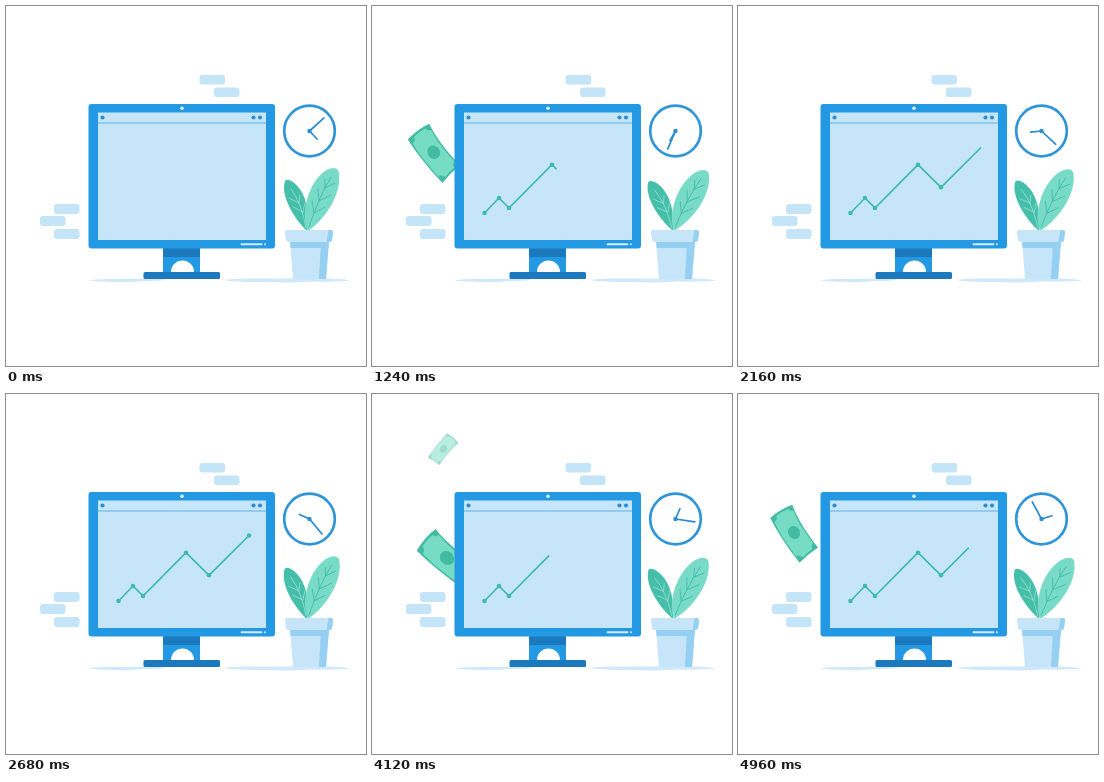
Recreate the animation shown at these times as an HTML page. Size 360 px wide and 360 px high, loop 5 s.

```html
<!DOCTYPE html>
<html lang="en">
<head>
<meta charset="utf-8">
<title>Growing chart</title>
<style>
  html, body { margin: 0; width: 100%; height: 100%; overflow: hidden; background: #fff; }
  svg { display: block; width: 100vw; height: 100vh; }
  .pale { fill: #c7e5f9; }
  .mid { fill: #95cff2; }
  .blue { fill: #2499e3; }
  .deep { fill: #1d79be; }
  .ink { fill: #2b8fd3; }
  .hand { stroke: #2b8bd0; stroke-width: 1.7; stroke-linecap: round; }
  .vein { fill: none; stroke-width: .9; stroke-linecap: round; }
  .dark { fill: #42bba2; }
  .mint { fill: #76dcc4; }
  #line { fill: none; stroke: #3fbba9; stroke-width: 1.7; stroke-linejoin: round; }
  #dots { fill: #3fbba9; }
</style>
</head>
<body>
<svg viewBox="0 0 360 360">
  <defs>
    <g id="bill">
      <path class="dark" d="M-12.5-24Q0-26.500 12.500-24C9.500-9 10.500 8 12.500 24.500Q0 25-10.500 28C-13 10-13.500-8-12.500-24Z"/>
      <path class="mint" d="M-6.500-22.500Q0-24 7-22.500Q7-19 10.500-18.500C8.500-6 9-.5 10.500 18.500Q7 19.500 7 23Q0 23.500-5.500 25.200Q-6-.8-6-.8Q-6 21-10.200 21.500C-12-2-12-8-11-18.500Q-7-18.500-6.500-22.500Z"/>
      <path class="mint" d="M-8-18H6V22L-6 23.500L-9.500 19Z"/>
      <ellipse class="dark" rx="5.800" ry="6.500"/>
    </g>
  </defs>

  <g fill="#c4e4f8">
    <rect x="193.500" y="69" width="25.500" height="9.500" rx="3"/>
    <rect x="208" y="81.500" width="25.500" height="9.500" rx="3"/>
    <rect x="48" y="198" width="25.500" height="10" rx="3"/>
    <rect x="34" y="210" width="25.500" height="10" rx="3"/>
    <rect x="48" y="223" width="25.500" height="10" rx="3"/>
  </g>
  <g fill="#cfe9fa">
    <path d="M82 274.500Q92 272.500 110 273L162 272.500Q158 275 138 275Q124 276.500 110 276Q92 275.500 82 274.500Z"/>
    <path d="M218 274Q228 272 250 272.500L322 272.500Q338 273 344 274.500Q334 276 305 275.500Q285 277 258 276Q228 276 218 274Z"/>
  </g>

  <g id="bills"></g>

  <path class="blue" d="M157 242H194V266H188A11.500 11.500 0 0 0 165 266H157Z"/>
  <rect class="deep" x="157" y="242" width="37" height="9"/>
  <rect class="deep" x="137.500" y="266" width="76.500" height="7" rx="1.500"/>
  <rect class="blue" x="82.500" y="98" width="186.500" height="144.500" rx="3"/>
  <rect class="pale" x="92" y="106.500" width="168" height="127.500"/>
  <path d="M92 117H260" stroke="#7fc3ee" stroke-width="1.400"/>
  <g class="ink">
    <circle cx="96.500" cy="111.500" r="2.100"/>
    <circle cx="247.500" cy="111.500" r="2.100"/>
    <circle cx="254" cy="111.500" r="2.100"/>
  </g>
  <circle cx="176" cy="102.300" r="1.800" fill="#e4f3fd"/>
  <path d="M235.500 238.300H255.500M258.900 238.300H259" stroke="#d3ebfb" stroke-width="1.900" stroke-linecap="round"/>

  <path id="line"/>
  <g id="dots"></g>

  <circle cx="303.500" cy="125" r="25.300" fill="#fff" stroke="#2f95d9" stroke-width="2.700"/>
  <path id="long" class="hand" d="M303.500 125V105.500"/>
  <path id="short" class="hand" d="M303.500 125V114"/>
  <circle class="ink" cx="303.500" cy="125" r="2.200"/>

  <g id="left">
    <path fill="#45bfa9" d="M301 225C289 214 274 190 279 175Q281 172 287 176C299 185 304 203 301 225Z"/>
    <path class="vein" stroke="#8edccd" d="M300 222Q296 198 285 183M297 206L287 201M293 197L283 192M297 206L299 197M293 197L294 189"/>
  </g>
  <g id="right">
    <path fill="#78dbc8" d="M302 225C294 208 302 177 319 165Q329 159 332.500 165C337 184 322 211 302 225Z"/>
    <path class="vein" stroke="#48bca8" d="M303 221Q312 193 325 171M308 207L306 195M313 195L312 183M319 182L319 173M308 207L319 201M313 195L325 189M319 182L329 177"/>
  </g>
  <path class="pale" d="M284 235H323L320 273H287Z"/>
  <path class="mid" d="M284 235H323L322.700 242H284.600ZM315 235H323L320 273H313Z"/>
  <path class="pale" d="M281 224H325Q327.500 224 327 227L326 234Q325.500 236 323 236H282.500Q280.500 236 280 234L279 227Q278.500 224 281 224Z"/>
  <path class="mid" d="M322.500 224H325Q327.500 224 327 227L326 234Q325.500 236 323 236H320.500Z"/>
</svg>
<script>
  const LOOP = 5000, CYCLE = 3000;
  const $ = id => document.getElementById(id);
  const add = (parent, name, attrs) => {
    const el = document.createElementNS('http://www.w3.org/2000/svg', name);
    for (const key in attrs) el.setAttribute(key, attrs[key]);
    return parent.appendChild(el);
  };
  const spin = (id, angle, x, y) => $(id).setAttribute('transform', `rotate(${angle} ${x} ${y})`);

  // Chart
  const points = [[112.5, 207], [127, 192], [137, 202], [180, 158.7], [203, 181.3], [243, 141.5]];
  const reach = [0];
  for (let i = 1; i < points.length; i++) {
    const [a, b] = [points[i - 1], points[i]];
    reach[i] = reach[i - 1] + Math.hypot(b[0] - a[0], b[1] - a[1]);
  }
  const dots = points.map(([cx, cy]) => add($('dots'), 'circle', { cx, cy }));

  function drawChart(u) {
    const len = (u - 100) * 0.09;
    let d = '';
    points.forEach(([x, y], i) => {
      dots[i].setAttribute('r', Math.max(0, Math.min(2.3, (len - reach[i]) * 0.4)));
      if (len <= reach[i]) return;
      d += (i ? 'L' : 'M') + x + ' ' + y;
      const next = points[i + 1];
      if (next && len < reach[i + 1]) {
        const k = (len - reach[i]) / (reach[i + 1] - reach[i]);
        d += `L${x + (next[0] - x) * k} ${y + (next[1] - y) * k}`;
      }
    });
    $('line').setAttribute('d', d);
  }

  // Bill flight: age, x, y, angle, scale, opacity
  const flight = [
    [0, 116, 182, -85, 1.2, 1],
    [92, 85, 171, -68, 1.2, 1],
    [120, 75, 164, -49, 1.15, 1],
    [292, 56, 138.5, -31, 1.03, 1],
    [360, 48.5, 109.5, -8, 0.92, 1],
    [395, 49.5, 99.5, 4, 0.9, 1],
    [452, 71.5, 55, 41, 0.6, 0.5],
    [500, 82, 43, 58, 0.45, 0]
  ];
  const births = [0, 365, 668];
  const bills = births.map(() => add($('bills'), 'use', { href: '#bill' }));

  function drawBills(u) {
    bills.forEach((bill, i) => {
      const age = (u - births[i] + 1000) % 1000;
      const n = flight.findIndex(key => key[0] > age);
      const shown = u > 0 && u < 2100 && n > 0;
      bill.setAttribute('visibility', shown ? 'visible' : 'hidden');
      if (!shown) return;
      const a = flight[n - 1], b = flight[n];
      const k = (age - a[0]) / (b[0] - a[0]);
      const [, x, y, angle, scale, opacity] = a.map((v, j) => v + (b[j] - v) * k);
      bill.setAttribute('transform', `translate(${x} ${y}) rotate(${angle}) scale(${scale})`);
      bill.setAttribute('opacity', opacity);
    });
  }

  function drawClock(t) {
    const again = t >= CYCLE ? 1 : 0;
    spin('long', 48 + 0.706 * t + 22 * again, 303.5, 125);
    spin('short', 137 + 0.0588 * t + 4 * again, 303.5, 125);
  }

  function drawPlant(u) {
    const open = (1 - Math.cos(2 * Math.PI * u / CYCLE)) / 2;
    spin('left', -3.5 * open, 301, 225);
    spin('right', 4.5 * open, 302, 225);
  }

  const start = performance.now();
  function frame(now) {
    // Hold each pose for 40 ms
    const t = Math.floor(Math.max(0, now - start) % LOOP / 40) * 40;
    const u = t % CYCLE;
    drawChart(u);
    drawBills(u);
    drawClock(t);
    drawPlant(u);
    requestAnimationFrame(frame);
  }
  frame(start);
</script>
</body>
</html>
```
